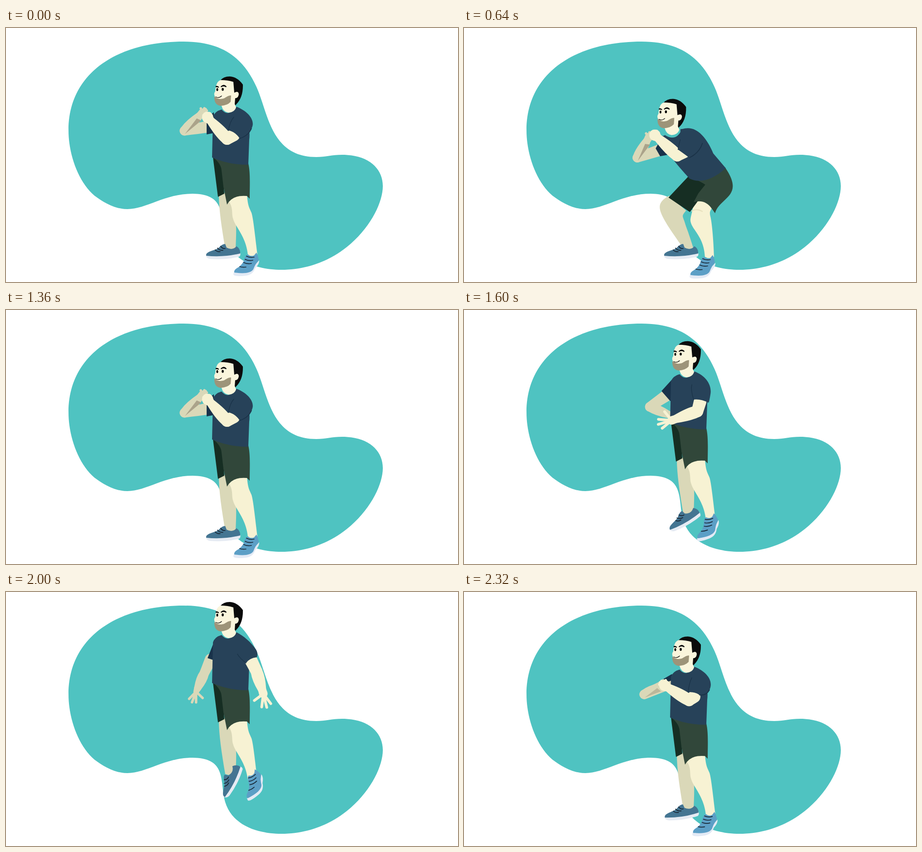
Recreate the animation shown at these times as an HTML page. Size 998 by 561 pixels, loop 2.36 s.

```html
<!DOCTYPE html>
<html lang="en">
<head>
<meta charset="utf-8">
<title>Squat jump</title>
<style>
html, body { margin: 0; width: 100%; height: 100%; overflow: hidden; background: #fff; }
svg { display: block; width: 100vw; height: 100vh; }
.line { fill: none; stroke-linecap: round; stroke-linejoin: round; }
.skin { fill: #f7f2d3; }
.shade { fill: #dad8b8; }
.navy { fill: #274259; }
.lace { stroke: #16222e; stroke-width: 1.7; }
</style>
</head>
<body>
<svg viewBox="0 0 998 561">
  <path fill="#4fc3c1" d="M138 226C138 100 245 30 392 30C480 30 525 68 553 130C579 187 584 285 685 285C705 285 720 280 742 280C800 280 832 310 832 349C832 412 750 534 608 534C555 534 488 515 480 445C475 400 475 367 412 366C350 366 310 400 268 400C240 400 215 385 195 370C160 340 138 280 138 226Z"/>
  <g id="man">
    <path id="backUpper" class="shade"/>
    <path id="backFore" class="shade"/>
    <path id="crease" fill="#aba38a"/>
    <path id="backHand" class="shade"/>
    <path id="backFingers" class="line" stroke="#dad8b8" stroke-width="5.5"/>
    <path id="backSleeve" fill="#18324a"/>
    <path id="backLeg" class="shade"/>
    <g id="backShoe">
      <path fill="#e6ebf3" d="M441 500Q441 508 450 510Q485 513 515 505Q519 502 517 496Z"/>
      <path fill="#447592" d="M442 501C443 493 460 492 469 486Q477 477 484 477L487 485Q500 492 509 482Q518 488 517 498Q480 507 442 503Z"/>
      <path class="line lace" d="M462 490Q466 495 473 494M467 486Q472 492 479 491M474 482Q478 488 484 487"/>
    </g>
    <path id="frontLeg" class="skin"/>
    <path id="knee" class="line" stroke="#e9e2bf" stroke-width="2.5" d="M503 404Q514 398 526 405"/>
    <g id="frontShoe">
      <path fill="#e3eaf5" d="M503 539Q506 542 530 540Q543 535 548 525L559 513Q560 521 550 531Q545 545 530 547Q503 550 502 544Z"/>
      <path fill="#5c9fc6" d="M534 500Q541 506 548 502L553 496Q557 503 558 513Q551 520 546 533Q538 545 504 540Q503 535 509 531Q524 523 527 508Q530 501 534 500Z"/>
      <path class="line lace" d="M531 504Q539 508 548 506M528 511Q536 515 545 513M525 518Q533 522 542 520M516 527Q522 529 530 528"/>
    </g>
    <path id="darkShort" fill="#162e23"/>
    <path id="short" fill="#31473a"/>
    <path id="torso" class="navy"/>
    <g id="head">
      <path fill="#0b0b0b" d="M473 116Q480 107 494 107Q511 108 523 125Q524 155 506 171L498 150Z"/>
      <path fill="#faf5dc" d="M474 115Q490 115 502 119L504 143Q513 138 514 146Q513 155 506 155L505 168L508 175Q505 186 491 187Q479 185 476 172L463 164L461 151Q458 145 462 140Q463 127 467 120Q470 116 474 115Z"/>
      <path fill="#9d9479" d="M460 151Q469 159 479 156C485 155 488 149 497 149L496 163Q489 171 474 172Q459 170 460 151Z"/>
      <path class="line" stroke="#111" stroke-width="1.3" d="M463 152Q470 156 476 150"/>
      <path fill="#0b0b0b" d="M463 128Q467 127 470 130L470 132Q466 130 463 131ZM474 129Q481 122 487 129L486 131Q480 127 475 131Z"/>
      <ellipse cx="466.500" cy="136" rx="2" ry="3.200"/>
      <ellipse cx="478.500" cy="135.500" rx="2.300" ry="3.200"/>
    </g>
    <path id="frontUpper" class="skin"/>
    <path id="frontFore" class="skin"/>
    <path id="frontHand" class="skin"/>
    <path id="frontFingers" class="line" stroke="#f7f2d3" stroke-width="6"/>
    <path id="sleeve" class="navy"/>
    <path id="fold" class="line" stroke="#1a3247" stroke-width="1.3"/>
    <path id="cuff" class="line" stroke="#1a3247" stroke-width="1.8"/>
  </g>
</svg>
<script>
const LOOP = 2360, RAD = Math.PI / 180;
const $ = id => document.getElementById(id);
const set = (id, d) => $(id).setAttribute('d', d);
const place = (id, v) => $(id).setAttribute('transform', v);
const clamp = v => Math.max(0, Math.min(1, v));
const NUM = /-?\d+(\.\d+)?/g;

// timelines: [ms, value]
const SQUAT = [[0, 0], [200, .15], [360, .52], [560, 1.31], [700, 1.42], [880, 1.36], [1040, 1], [1120, .67], [1240, .2], [1360, 0]];
const LIFT = [[1360, 0], [1400, 4], [1600, 38], [1680, 52], [1840, 77], [1960, 85], [2000, 85], [2240, 29], [2320, 9], [2360, 0]];
const SWING = [[1360, 0], [1480, 1], [1600, 2], [1880, 3], [2000, 3], [2190, 2], [2320, 1], [2360, 0]];
const POINT = [[1360, 0], [1600, .44], [1860, 1], [2000, 1], [2240, .28], [2320, .08], [2360, 0]];

// poses by squat depth: upright, half, low
const DEPTH = [0, .52, 1];
const BODY = {
  torso: [
    'M476 180Q461 184 457 196Q456 240 455 286Q490 302 535 302L537 247C540 225 535 190 509 174Q491 198 476 180Z',
    'M464 201Q452 203 449 215Q456 262 472 303Q505 319 552 306L541 262C540 230 530 196 494 192Q480 215 464 201Z',
    'M453 220Q444 222 441 234Q453 272 486 319Q520 335 566 308L546 270C537 235 520 205 487 209Q474 235 453 220Z'],
  short: [
    'M458 286Q475 300 476 315L480 350L488 390Q500 368 532 371L538 377C538 350 540 320 535 299Q490 285 458 286Z',
    'M479 302Q495 318 501 333L497 365L494 392Q510 379 538 388L545 396C545 355 575 345 552 304Q515 300 479 302Z',
    'M488 316Q508 328 518 340L508 365L501 388Q522 378 543 394L550 403C555 365 600 360 565 306Q520 312 488 316Z'],
  darkShort: [
    'M457 286L468 373L482 366L480 340L479 315Q490 292 457 286Z',
    'M480 302L459 367L495 371L499 350L504 333Q505 308 480 302Z',
    'M488 316L455 371L497 390L510 365L521 340Q520 318 488 316Z'],
  backLeg: [
    'M470 368C470 400 476 440 484 487Q496 492 507 488C508 460 510 430 505 405C500 390 490 380 483 364Z',
    'M460 365C446 390 456 402 484 486Q496 492 507 488C505 460 500 440 500 415C498 395 492 380 494 366Z',
    'M456 368C432 390 439 402 484 486Q496 492 507 488C500 455 495 440 494 425C490 405 485 400 492 386Z'],
  frontLeg: [
    'M491 382C502 395 498 410 501 420C506 440 530 460 534 501Q544 507 555 500C550 460 546 420 542 408C538 398 534 395 532 368Q505 362 491 382Z',
    'M496 386C500 405 496 420 500 435C508 455 526 465 530 507Q541 513 552 507C549 465 545 435 542 425C538 410 536 405 538 386Q515 374 496 386Z',
    'M502 384C503 405 498 418 500 430C505 450 528 462 531 506Q541 512 552 506C550 465 546 430 543 420C540 408 540 405 543 392Q522 372 502 384Z']
};
const HEAD = ['translate(0 0)', 'translate(-14 16)', 'translate(-24 34)'];

// poses by arm swing: squat, clasped, near clasp, half swing, down
const REACH = [-1, 0, 1, 2, 3];
// neck, back of sleeve, cuff, hem, inner fold
const SLEEVE = [
  'M487 209C515 208 535 225 531 245Q524 265 503 274Q491 263 478 256Q481 240 485 232',
  'M509 174C535 184 552 205 542 222Q535 238 516 244Q506 229 491 226Q495 205 503 197',
  'M509 174C535 184 552 205 542 225Q535 238 520 236Q510 229 495 230Q497 210 503 198',
  'M509 174C535 184 548 205 544 225Q542 238 540 243Q522 234 507 236Q500 215 503 203',
  'M509 174C525 182 540 195 552 212Q557 220 554 229Q537 231 530 242Q515 230 511 222'];
const BACK_SLEEVE = [
  'M445 222L429 246L436 269L452 266Z',
  'M459 186L443 198L443 235L459 232Z',
  'M459 190L440 201L452 206L460 203Z',
  'M459 192L436 217L455 239L462 240Z',
  'M459 196L445 231L457 235L462 235Z'];
// cuff x y, elbow x y, forearm angle, length, hand openness
const FRONT = [
  '490 263 476 271 224 57 0', '503 236 488 245 228 55 0', '508 240 497 248 211 54 0.1',
  '521 241 515 262 161 51 1', '542 238 553 260 73 43 1'];
const BACK = [
  '438 254 386 269 -56 45 0', '446 218 394 227 -45 48 0', '450 212 398 235 -26 40 0',
  '447 227 410 252 22 45 0.6', '452 234 438 264 114 36 1'];

// smooth value through timed points, flat at turning points
function at(keys, t) {
  const n = keys.length - 1;
  if (t <= keys[0][0]) return keys[0][1];
  if (t >= keys[n][0]) return keys[n][1];
  const i = keys.findIndex(k => k[0] > t) - 1;
  const slope = j => {
    if (j < 1 || j >= n) return 0;
    const [a, b, c] = [keys[j - 1], keys[j], keys[j + 1]];
    return (c[1] - b[1]) * (b[1] - a[1]) <= 0 ? 0 : (c[1] - a[1]) / (c[0] - a[0]);
  };
  const [t0, v0] = keys[i], [t1, v1] = keys[i + 1];
  const h = t1 - t0, x = (t - t0) / h, y = 1 - x;
  return v0 * y * y * (1 + 2 * x) + v1 * x * x * (3 - 2 * x)
    + h * x * y * (slope(i) * y - slope(i + 1) * x);
}

// mixes the numbers inside strings of equal form, also beyond the ends
function blend(list, stops, v) {
  let i = 0;
  while (i < stops.length - 2 && v > stops[i + 1]) i++;
  const k = (v - stops[i]) / (stops[i + 1] - stops[i]);
  const to = list[i + 1].match(NUM);
  let j = 0;
  return list[i].replace(NUM, a => (+a + (to[j++] - a) * k).toFixed(2));
}

const polar = (p, r, a) => [p[0] + r * Math.cos(a), p[1] + r * Math.sin(a)];

// tapered limb between two round ends, sides bulging by b
function limb(p, r, q, s, b = 0) {
  const dx = q[0] - p[0], dy = q[1] - p[1];
  const dir = Math.atan2(dy, dx);
  const f = Math.acos(Math.max(-1, Math.min(1, (r - s) / (Math.hypot(dx, dy) || 1))));
  const mid = side => polar([p[0] + dx * .4, p[1] + dy * .4], r * .6 + s * .4 + b, dir + side * Math.PI / 2);
  const big = f > Math.PI / 2 ? 1 : 0;
  return `M${polar(p, r, dir + f)}Q${mid(1)} ${polar(q, s, dir + f)}`
    + `A${s} ${s} 0 ${big} 0 ${polar(q, s, dir - f)}`
    + `Q${mid(-1)} ${polar(p, r, dir - f)}A${r} ${r} 0 ${1 - big} 0 ${polar(p, r, dir + f)}Z`;
}

function arm(name, poses, swing, r, side, reach) {
  const [cx, cy, ex, ey, angle, len, open] = blend(poses, REACH, swing).split(' ').map(Number);
  const o = clamp(open), a = angle * RAD, cuff = [cx, cy], elbow = [ex, ey];
  const wrist = polar(elbow, len, a), palm = polar(wrist, 9, a);
  set(name + 'Upper', limb(cuff, r[0], elbow, r[1]));
  set(name + 'Fore', limb(elbow, r[1], wrist, r[2], 4));
  set(name + 'Hand', limb(wrist, r[2], palm, r[3] - 3 * o));
  set(name + 'Fingers', [[70, .8], [24, .95], [3, 1], [-20, .88]].map(([turn, size]) =>
    `M${palm}L${polar(palm, 10 + (reach * size - 10) * o, a + side * turn * RAD)}`).join(''));
  return { elbow, a, len };
}

function draw(t) {
  const squat = at(SQUAT, t), point = at(POINT, t);
  const swing = squat > 0 ? -squat : at(SWING, t);
  place('man', `translate(0 ${-at(LIFT, t)})`);
  for (const id in BODY) set(id, blend(BODY[id], DEPTH, squat));
  place('head', blend(HEAD, DEPTH, squat));

  const step = Math.min(1, squat / .52);
  place('backShoe', `translate(0 ${-4 * point}) rotate(${-59 * point} 497 486)`);
  place('frontShoe', `translate(${-4 * step} ${5.5 * step - 15 * point}) rotate(${-34 * point} 544 500)`);
  $('knee').style.opacity = clamp(squat * 2 - 1);

  const back = arm('back', BACK, swing, [13, 10.5, 8, 9], -1, 25);
  const along = polar(back.elbow, back.len * .8, back.a);
  set('crease', `M${polar(back.elbow, 7, 80 * RAD)}L${along}L${polar(along, 11, back.a + 1.2)}Z`);
  $('crease').style.opacity = clamp(1.6 - swing);
  arm('front', FRONT, swing, [14, 13, 9, 12.5], 1, 31);

  const sleeve = blend(SLEEVE, REACH, swing), n = sleeve.match(NUM);
  set('sleeve', sleeve + 'Z');
  set('backSleeve', blend(BACK_SLEEVE, REACH, swing));
  set('fold', `M${n.slice(14, 16)}Q${n.slice(16)}`);
  set('cuff', `M${n.slice(6, 8)}Q${n.slice(8, 12)}`);
  $('cuff').style.opacity = clamp(2 - swing);
}

const start = performance.now();
function tick() {
  draw((performance.now() - start) % LOOP);
  requestAnimationFrame(tick);
}
draw(0);
requestAnimationFrame(tick);
</script>
</body>
</html>
```
